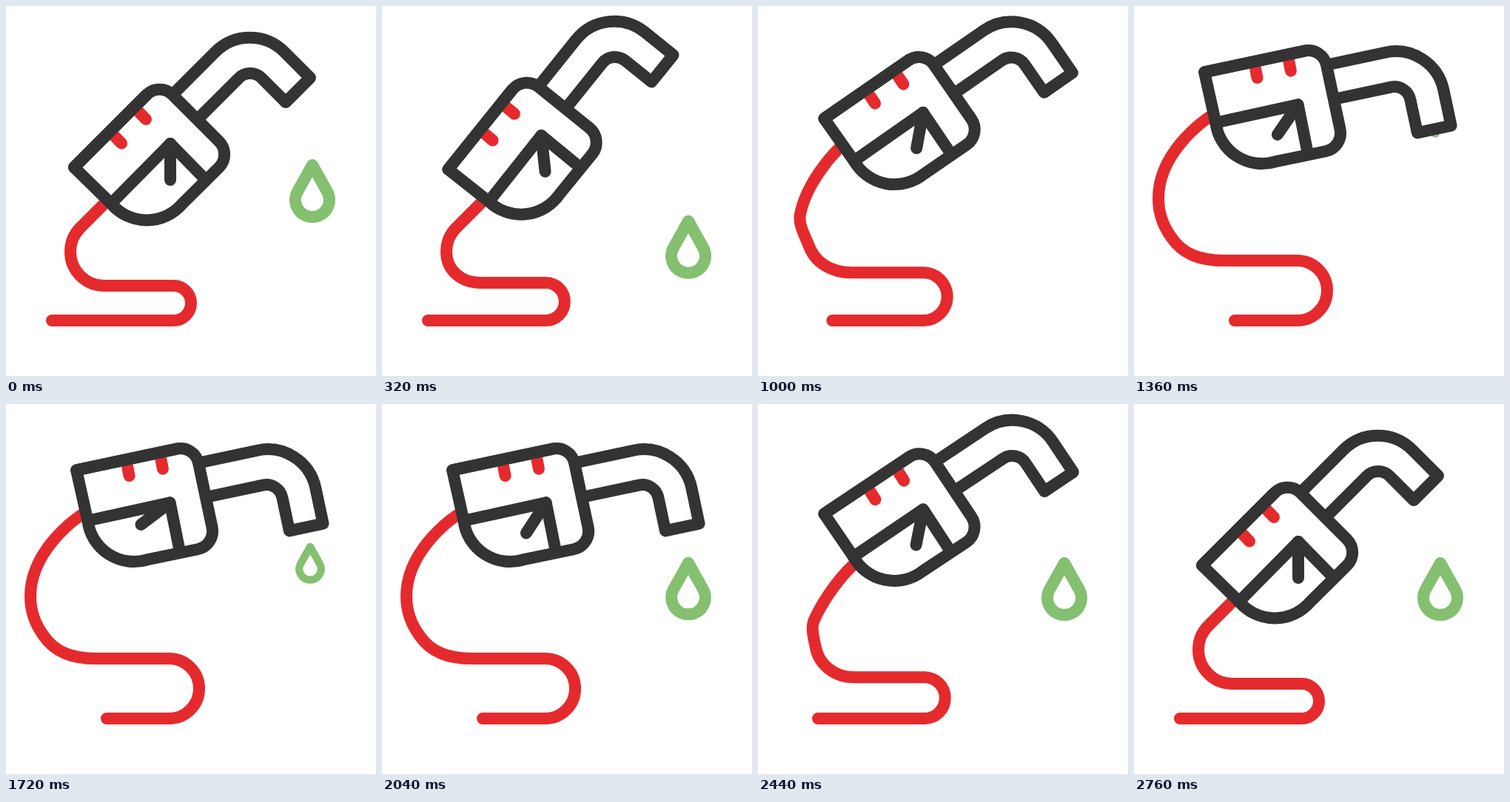
Recreate the animation shown at these times as an HTML page. Size 500x500 px, loop 3 s.

```html
<!DOCTYPE html>
<html lang="en">
<head>
<meta charset="utf-8">
<title>Fuel nozzle</title>
<style>
  html, body { margin: 0; width: 100%; height: 100%; overflow: hidden; background: #fff; }
  svg { display: block; width: 100vw; height: 100vh; }
  path { fill: none; stroke-width: 16; stroke-linecap: round; stroke-linejoin: round; }
  .dark { stroke: #333; }
  .red { stroke: #e52a2d; }
  .green { stroke: #84c070; }
  .solid { fill: #fff; }
</style>
</head>
<body>
<svg viewBox="0 0 500 500">
  <path id="hose" class="red"/>
  <path id="drop" class="green" d="M414 215L394 250.7A23 23 0 1 0 434 250.7Z"/>
  <g id="nozzle">
    <path class="dark solid" d="M229 116L282.6 62.4A66 66 0 0 1 376.4 62.4L411 97L378 130L345.6 97.6A22 22 0 0 0 314.4 97.6L262 150"/>
    <path id="body" class="dark solid" d="M92 218L190 120A25 25 0 0 1 225 120L287.8 182.8A25 25 0 0 1 287.8 218.2L238 267.5A63 63 0 0 1 142 267Z"/>
    <path class="red" d="M142 171L156 185.5M175 138.5L189 153"/>
    <path class="dark" d="M92 218L190 120M142 267L222 186L269 234"/>
    <path id="needle" class="dark" d="M222 186V235"/>
  </g>
</svg>
<script>
const LOOP = 3000;
const [hose, drop, nozzle, needle] =
  ['hose', 'drop', 'nozzle', 'needle'].map(id => document.getElementById(id));

const mix = (a, b, u) => a + (b - a) * u;
const part = (t, a, b) => Math.min(1, Math.max(0, (t - a) / (b - a)));
const ease = (t, a, b) => { const p = part(t, a, b); return p * p * (3 - 2 * p); };

// h: 0 resting, 1 lifted. The upper end bows outwards on the way.
function hosePath(h, kick) {
  const bow = 4 * h * (1 - h);
  const pt = (x0, y0, x1, y1, bx = 0, by = 0) =>
    `${mix(x0, x1, h) + bx * bow} ${mix(y0, y1, h) + by * bow} `;
  const floor = 425;
  const top = mix(378, 344, h) - 5 * kick;
  const r = (floor - top) / 2;
  const loop = mix(250, 261, h) - 4 * kick - r;

  return 'M' + pt(150, 250, 125, 136, -8, -14) +
    'C' + pt(133.5, 266.5, 82, 158, -8, -14) + pt(117, 283, 33, 205, -8) + pt(100.5, 299.5, 33, 260, -8) +
    'C' + pt(92, 308, 33, 280, -8) + pt(87, 320, 40, 298) + pt(87, 332, 50, 312) +
    'C' + pt(87, 357.5, 66, 336) + `${mix(107.5, 90, h)} ${top} ${mix(133, 122, h)} ${top}` +
    `H${loop}A${r} ${r} 0 0 1 ${loop} ${floor}H${mix(62, 136, h)}`;
}

function setDrop(x, y, s) {
  drop.setAttribute('transform', `translate(${x} ${y}) scale(${s}) translate(-414 -250)`);
}

function draw(t) {
  const kick = ease(t, 130, 400) - ease(t, 400, 660);
  const rise = ease(t, 796, 1196);
  const lift = rise - ease(t, 2160, 2760);
  const turn = ease(t, 800, 1340) - ease(t, 2040, 2700);
  const slack = rise - ease(t, 2040, 2640);
  const swing = ease(t, 1310, 1645) - ease(t, 1645, 1980);

  hose.setAttribute('d', hosePath(slack, kick));
  nozzle.setAttribute('transform',
    `translate(${-14.5 * lift} ${-119 * lift}) rotate(${33 * turn - 7.8 * kick} 117 243)`);
  needle.setAttribute('transform', `rotate(${23 * swing} 222 186)`);

  drop.style.display = t > 540 && t < 1280 ? 'none' : '';
  if (t < 1280) {
    const p = part(t, 120, 520);
    setDrop(414, 250 + 300 * p * p, 1);
  } else {
    const u = ease(t, 1280, 2080);
    setDrop(mix(407, 414, u), mix(168, 250, u), mix(0.15, 1, u));
  }
}

const start = performance.now();
function tick() {
  draw((performance.now() - start) % LOOP);
  requestAnimationFrame(tick);
}
tick();
</script>
</body>
</html>
```
